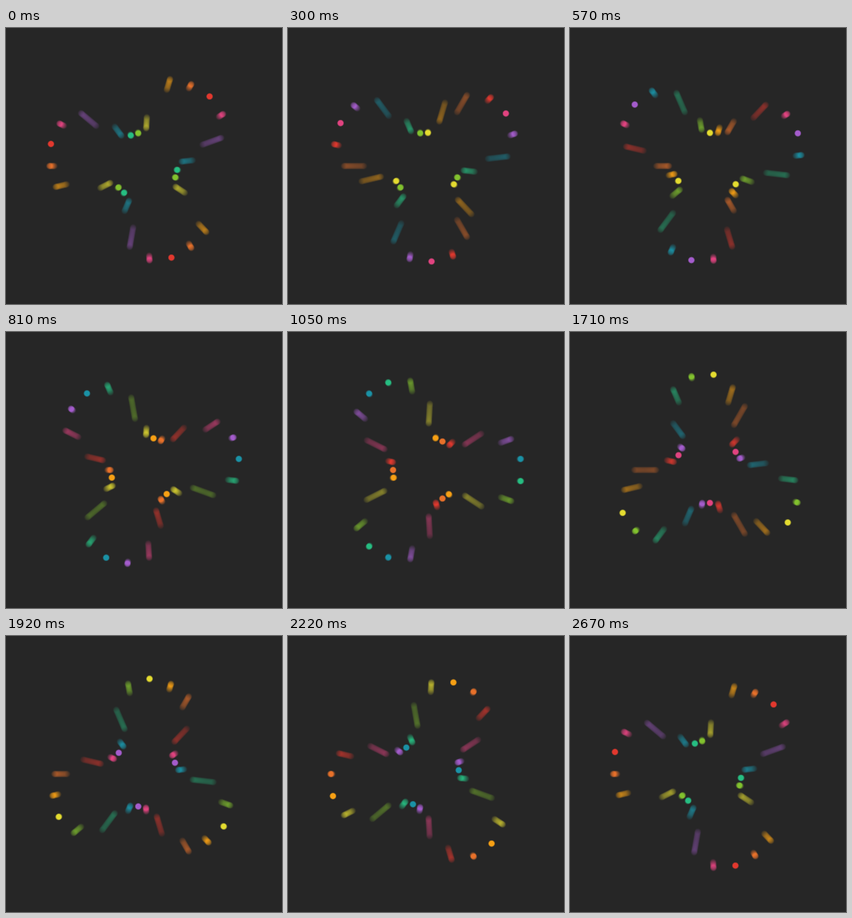
An HTML page with a canvas that plays this animation: 400 by 400 pixels, repeating every 2700 ms.

```html
<!DOCTYPE html>
<html lang="en">
<head>
<meta charset="utf-8">
<title>Pulsing dots</title>
<style>
  html, body { margin: 0; height: 100%; overflow: hidden; background: #262626; }
  canvas { display: block; }
</style>
</head>
<body>
<canvas id="stage" width="400" height="400"></canvas>
<script>
const SIZE = 400, CENTER = 200, LOOP = 2700, ARMS = 3;
const R_MIN = 47.7, R_MAX = 138.6;
const DOT = 4.4, SOFT = 1.7;                       // dot radius and edge width
const SHUTTER = 185, SAMPLES = 30, GLOW = 1.5;     // motion blur
const BG = 38;

const palette = '#e2382e #e14380 #a45ccc #1a92a6 #26be82 #82c22e #e4dc30 #f7a014 #e8712a'
  .split(' ')
  .map(hex => [1, 3, 5].map(i => parseInt(hex.slice(i, i + 2), 16)));
const STEP = 2 * Math.PI / (ARMS * palette.length), START = -3.5 * STEP;
const DELAY = LOOP / palette.length;
const ORANGE = 7;

const ctx = document.getElementById('stage').getContext('2d');
const image = ctx.createImageData(SIZE, SIZE);
const pixels = image.data;

const clamp = x => Math.max(0, Math.min(1, x));
const easeInOut = x => x < 0.5 ? 4 * x ** 3 : 1 - 4 * (1 - x) ** 3;

// The orange dots run half a step behind the regular rhythm
const peakTime = k => DELAY * (k === ORANGE ? k + 0.5 : k);

function radiusAt(time) {
  const phase = (time + 2 * LOOP) % LOOP / LOOP;
  return R_MAX - (R_MAX - R_MIN) * easeInOut(1 - Math.abs(1 - 2 * phase));
}

// Disc moving along a ray, blurred over the given radii
function drawStreak(angle, radii, color) {
  const cos = Math.cos(angle), sin = Math.sin(angle), pad = DOT + SOFT;
  const near = Math.min(...radii), far = Math.max(...radii);
  const range = unit => [
    Math.floor(CENTER + Math.min(near * unit, far * unit) - pad),
    Math.ceil(CENTER + Math.max(near * unit, far * unit) + pad)
  ];
  const [x0, x1] = range(cos), [y0, y1] = range(sin);
  for (let y = y0; y < y1; y++) {
    for (let x = x0; x < x1; x++) {
      const dx = x + 0.5 - CENTER, dy = y + 0.5 - CENTER;
      const along = dx * cos + dy * sin, across = dy * cos - dx * sin;
      if (Math.abs(across) > pad) continue;
      let sum = 0;
      for (const r of radii) {
        sum += clamp((DOT - Math.hypot(along - r, across)) / SOFT + 0.5) ** GLOW;
      }
      const alpha = (sum / radii.length) ** (1 / GLOW), i = (y * SIZE + x) * 4;
      color.forEach((value, c) => { pixels[i + c] += (value - pixels[i + c]) * alpha; });
    }
  }
}

function frame(now) {
  const time = now % LOOP;
  for (let i = 0; i < pixels.length; i++) pixels[i] = i % 4 === 3 ? 255 : BG;
  palette.forEach((color, k) => {
    const radii = Array.from({ length: SAMPLES }, (_, i) =>
      radiusAt(time - peakTime(k) + SHUTTER * ((i + 0.5) / SAMPLES - 0.5)));
    for (let arm = 0; arm < ARMS; arm++) {
      drawStreak(START + (k + arm * palette.length) * STEP, radii, color);
    }
  });
  ctx.putImageData(image, 0, 0);
  requestAnimationFrame(frame);
}

frame(performance.now());
</script>
</body>
</html>
```
